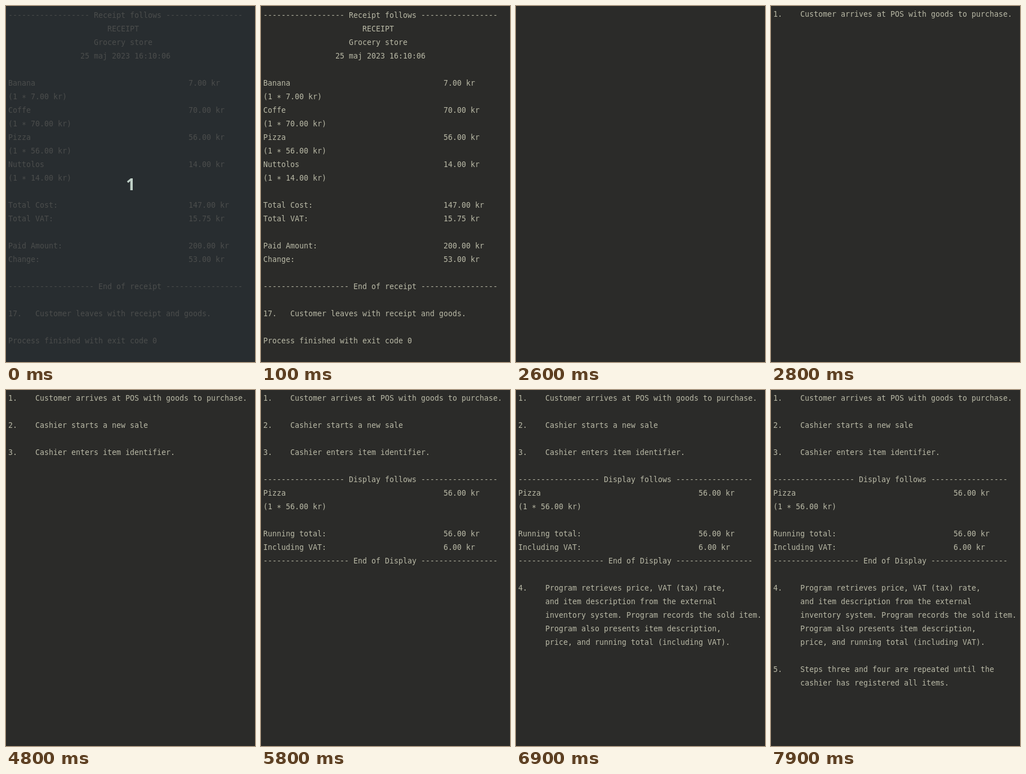
Recreate the animation shown at these times as an HTML page. Size 442 px wide and 630 px high, loop 8000 ms.

```html
<!DOCTYPE html>
<html lang="en">
<head>
<meta charset="utf-8">
<title>Checkout console</title>
<style>
  html, body { margin: 0; width: 100%; height: 100%; overflow: hidden; background: #2b2b29; }
  svg { display: block; width: 442px; height: 630px; }
  .console { font: 13.29px "DejaVu Sans Mono", monospace; }
  .count { font: 600 29px "Noto Sans", sans-serif; fill: #c0d0c7; }
</style>
</head>
<body>
<svg id="stage" viewBox="0 0 442 630">
  <rect id="back" width="442" height="630"/>
  <g id="console" class="console"></g>
  <text id="count" class="count" x="213" y="326">1</text>
</svg>
<script>
const LOOP = 8000, CELL = 8, LINE = 24, LEFT = 4;
const NS = "http://www.w3.org/2000/svg";
const $ = id => document.getElementById(id);

const at = (col, text) => " ".repeat(col) + text;
const row = (label, amount) => label.padEnd(40) + amount + " kr";
const rule = title => "-".repeat(33 - title.length) + " " + title + " " + "-".repeat(17);
const item = (name, price) => [row(name, price), `(1 * ${price} kr)`];
const step = (n, ...lines) => lines.map((s, i) => (i ? "" : n + ".").padEnd(6) + s);

const receipt = [
  rule("Receipt follows"),
  at(22, "RECEIPT"),
  at(19, "Grocery store"),
  at(16, "25 maj 2023 16:10:06"),
  "",
  ...item("Banana", "7.00"),
  ...item("Coffe", "70.00"),
  ...item("Pizza", "56.00"),
  ...item("Nuttolos", "14.00"),
  "",
  row("Total Cost:", "147.00"),
  row("Total VAT:", "15.75"),
  "",
  row("Paid Amount:", "200.00"),
  row("Change:", "53.00"),
  "",
  rule("End of receipt"),
  "",
  ...step(17, "Customer leaves with receipt and goods."),
  "",
  "Process finished with exit code 0"
];

const display = [
  rule("Display follows"),
  ...item("Pizza", "56.00"),
  "",
  row("Running total:", "56.00"),
  row("Including VAT:", "6.00"),
  rule("End of Display")
];

// Each block is visible from start to end; top is its first baseline.
const blocks = [
  [0, 2600, 21, receipt],
  [2800, LOOP, 19, step(1, "Customer arrives at POS with goods to purchase.")],
  [3800, LOOP, 67, step(2, "Cashier starts a new sale")],
  [4800, LOOP, 115, step(3, "Cashier enters item identifier.")],
  [5800, LOOP, 163, display],
  [6900, LOOP, 355, step(4,
    "Program retrieves price, VAT (tax) rate,",
    "and item description from the external",
    "inventory system. Program records the sold item.",
    "Program also presents item description,",
    "price, and running total (including VAT).")],
  [7900, LOOP, 499, step(5,
    "Steps three and four are repeated until the",
    "cashier has registered all items.")]
].map(([start, end, top, lines]) => {
  const g = document.createElementNS(NS, "g");
  lines.forEach((line, i) => {
    for (const word of line.matchAll(/\S+/g)) {
      const text = document.createElementNS(NS, "text");
      text.setAttribute("x", LEFT + word.index * CELL);
      text.setAttribute("y", top + i * LINE + (word[0] === "*" ? 2 : 0));
      text.textContent = word[0];
      g.append(text);
    }
  });
  $("console").append(g);
  return { start, end, g };
});

function draw(t) {
  const dim = t < 100;
  $("back").setAttribute("fill", dim ? "#282d30" : "#2b2b29");
  $("console").setAttribute("fill", dim ? "#4b4d4c" : "#b9b9a6");
  $("count").style.display = dim ? "" : "none";
  for (const { start, end, g } of blocks)
    g.style.display = t >= start && t < end ? "" : "none";
}

const begin = performance.now();
function tick() {
  draw((performance.now() - begin) % LOOP);
  requestAnimationFrame(tick);
}
tick();
</script>
</body>
</html>
```
